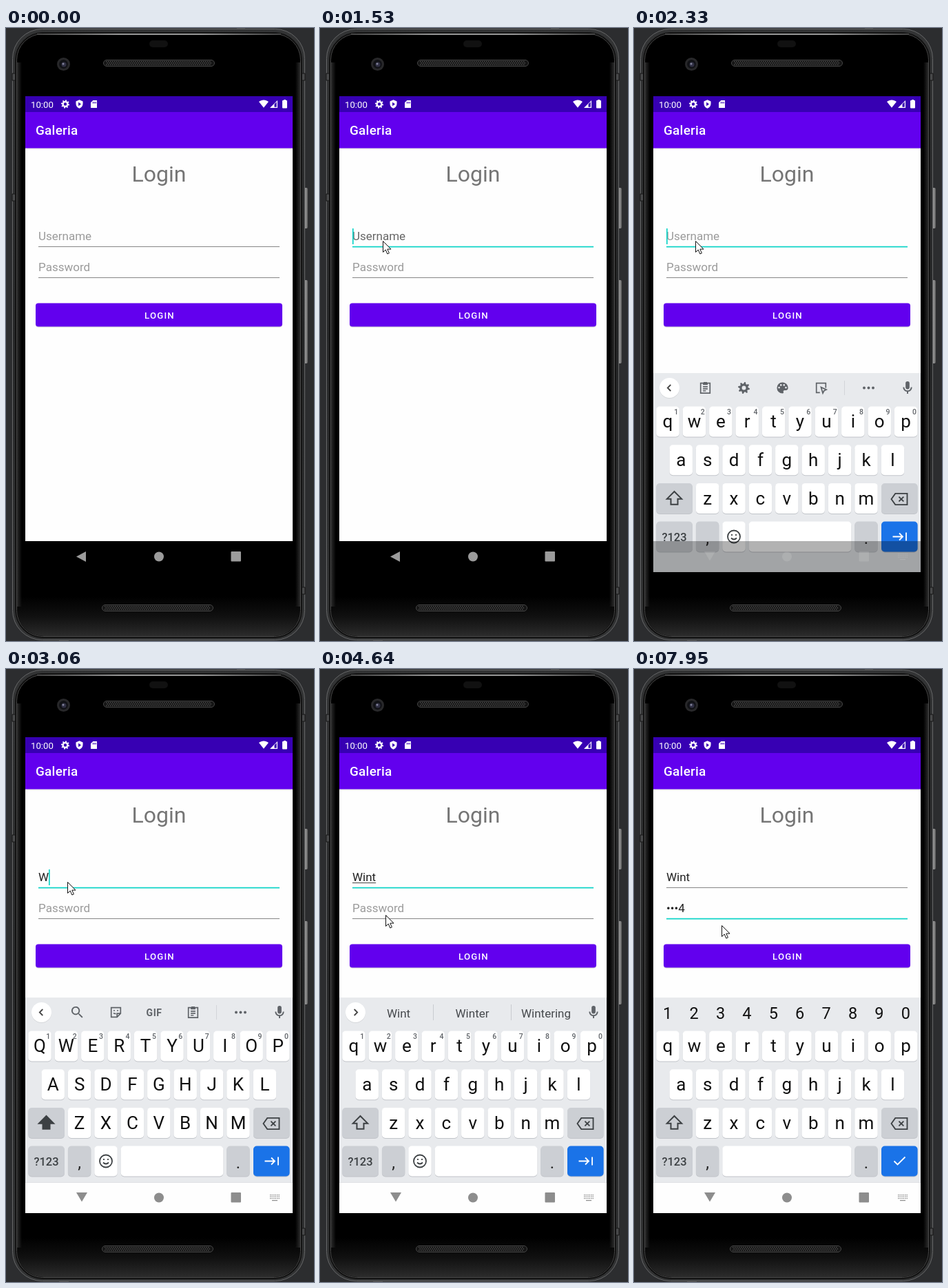
Animation of 447 by 890 pixels, one loop 8000 ms. Source, as an HTML page with a canvas:

```html
<!DOCTYPE html>
<html lang="en">
<head>
<meta charset="utf-8">
<title>Login screen</title>
<style>
  html, body { margin: 0; width: 447px; height: 890px; overflow: hidden; background: #2c2d2f; }
  canvas { display: block; }
</style>
</head>
<body>
<canvas id="stage" width="447" height="890"></canvas>
<script>
const ctx = document.getElementById('stage').getContext('2d');
const LOOP = 8000;
const PURPLE = '#6200ee', TEAL = '#0fd4c8', ICON = '#5f6368', KEY_GREY = '#cccfd4', NAV = '#8d8d8d';

// Icons on a 24-unit grid
const ICONS = {
  search: 'M15.5 14h-.8l-.3-.3A6.5 6.5 0 1 0 13.7 14.4l.3.3v.8l5 5 1.5-1.5zm-6 0a4.5 4.5 0 1 1 0-9 4.5 4.5 0 0 1 0 9z',
  mic: 'M12 14a3 3 0 0 0 3-3V5a3 3 0 0 0-6 0v6a3 3 0 0 0 3 3zm5-3a5 5 0 0 1-10 0H5a7 7 0 0 0 6 6.9V21h2v-3.1a7 7 0 0 0 6-6.9z',
  palette: 'M12 3a9 9 0 0 0 0 18c1.5 0 2-1 1.5-2.2-.6-1.6.3-2.8 2-2.8H18a4 4 0 0 0 3-4c0-5-4-9-9-9z' +
    [[5, 11.5], [8, 7.5], [13, 7.5], [16, 11.5]].map(([x, y]) => `M${x} ${y}a1.5 1.5 0 1 0 3 0a1.5 1.5 0 1 0-3 0z`).join(''),
  clipboard: 'M4 4h16v17H4zM9 3h6M8 6h8M8 10h8M8 13.5h8M8 17h5',
  sticker: 'M14 20H4V4h16v10zM14 20v-6h6M9 8v2M15 8v2M8 13q2 2 4 1',
  touch: 'M10 20H4V4h16v8M12 11l3 10 2-4 4-2z',
  shift: 'M12 4L3.5 12.5H8V19h8v-6.5h4.5z',
  backspace: 'M7 5h15v14H7L2 12zM11.5 9l6 6M17.5 9l-6 6',
  smile: 'M3 12a9 9 0 1 0 18 0a9 9 0 1 0-18 0M9 8.5v2M15 8.5v2M8 14q4 4 8 0',
  next: 'M2 12h14M11.5 7l5 5-5 5M21.5 6v12',
  check: 'M4 12l5 5L20 6',
  left: 'M14 7l-5 5 5 5',
  right: 'M10 7l5 5-5 5',
  shield: 'M12 1l9 4v6c0 6-4 10-9 12-5-2-9-6-9-12V5zM9.5 7v10l7-5z',
  card: 'M20 2H10L4 8v14h16zM9 6h2v4H9zM12.5 6h2v4h-2zM16 6h2v4h-2z',
  wifi: 'M12 22L0 7C7 1 17 1 24 7z',
  signal: 'M1 23h22V1zM14 20.5V12l6.5-6.5v15z',
  gear: gearPath()
};
const POINTER = new Path2D('M.5.5v16l3.7-3.5 2.6 6 2.6-1.1-2.6-5.8h5.2z');

function gearPath() {
  let d = '';
  for (let i = 0; i < 32; i++) {
    const r = i % 4 < 2 ? 10 : 7.2, a = (i + .5) * Math.PI / 16;
    d += `${i ? 'L' : 'M'}${12 + r * Math.cos(a)} ${12 + r * Math.sin(a)}`;
  }
  return d + 'zM8.5 12a3.5 3.5 0 1 0 7 0a3.5 3.5 0 1 0-7 0z';
}

// Drawing helpers
function rect(x, y, w, h, fill, r = 0, stroke) {
  ctx.beginPath();
  ctx.roundRect(x, y, w, h, r);
  ctx.fillStyle = fill;
  ctx.fill();
  if (stroke) { ctx.strokeStyle = stroke; ctx.lineWidth = 1; ctx.stroke(); }
}
function dot(x, y, r, fill) {
  ctx.beginPath();
  ctx.arc(x, y, r, 0, 7);
  ctx.fillStyle = fill;
  ctx.fill();
}
function poly(fill, ...points) {
  ctx.beginPath();
  points.forEach(([x, y]) => ctx.lineTo(x, y));
  ctx.fillStyle = fill;
  ctx.fill();
}
function text(s, x, y, size, color, align = 'left', weight = 400, spacing = 0) {
  ctx.font = `${weight} ${size}px Roboto, sans-serif`;
  ctx.textAlign = align;
  ctx.letterSpacing = spacing + 'px';
  ctx.fillStyle = color;
  ctx.fillText(s, x, y);
}
function inputWidth(s) {
  ctx.font = '400 17px Roboto, sans-serif';
  ctx.letterSpacing = '0px';
  return ctx.measureText(s).width;
}
function icon(name, x, y, scale, color, line = 0) {
  const path = new Path2D(ICONS[name]);
  ctx.save();
  ctx.translate(x, y);
  ctx.scale(scale, scale);
  ctx.translate(-12, -12);
  ctx.fillStyle = ctx.strokeStyle = color;
  ctx.lineWidth = line;
  if (line) ctx.stroke(path); else ctx.fill(path, 'evenodd');
  ctx.restore();
}
function fade(x0, y0, x1, y1, ...colors) {
  const g = ctx.createLinearGradient(x0, y0, x1, y1);
  colors.forEach((c, i) => g.addColorStop(i / (colors.length - 1), c));
  return g;
}

// Timing helpers
const between = (t, a, b) => t >= a && t < b;
function pick(t, value, ...steps) {
  for (let i = 0; i < steps.length && t >= steps[i]; i += 2) value = steps[i + 1];
  return value;
}
function follow(t, points) {
  const i = points.findIndex(p => p[0] > t);
  if (i < 0) return points.at(-1).slice(1);
  const [t0, x0, y0] = points[i - 1], [t1, x1, y1] = points[i], k = (t - t0) / (t1 - t0);
  return [Math.round(x0 + (x1 - x0) * k), Math.round(y0 + (y1 - y0) * k)];
}

function speaker(x, y) {
  rect(x + .5, y + .5, 161, 9, '#151515', 5, '#464646');
  for (let row = 0; row < 3; row++)
    for (let i = 0; i < 51; i++) rect(x + 4 + i * 3 + row % 2 * 1.5, y + 2 + row * 2.2, 1.5, 1.3, '#555');
}

function drawPhone() {
  rect(0, 0, 447, 890, '#2c2d2f');
  [[232, 59], [366, 121]].forEach(([y, h]) => rect(432, y, 6, h, fade(432, 0, 438, 0, '#444', '#999', '#555'), 2));
  rect(335, 0, 12, 4, '#444');
  rect(77, 886, 14, 4, '#444');
  rect(9.5, 1.5, 424, 887, fade(0, 0, 0, 890, '#333435', '#252627', '#333435'), 43, '#666768');
  [[9, 66], [429, 66], [9, 241], [429, 812]].forEach(([x, y]) => rect(x, y, 5, 10, '#48494a', 0, '#161616'));
  rect(13.5, 6.5, 416, 879, '#0a0a0a', 40, '#1b1b1b');
  rect(15.5, 8.5, 412, 875, '#000', 38, '#4a4a4a');
  rect(16, 50, 7, 790, fade(16, 0, 23, 0, '#2b2b2b', '#000'));
  rect(420, 50, 7, 790, fade(420, 0, 427, 0, '#000', '#2b2b2b'));
  rect(45, 8, 354, 2, fade(45, 0, 399, 0, '#444', '#999', '#999', '#444'));
  rect(16, 825, 411, 58, fade(0, 825, 0, 883, 'rgba(40,40,40,0)', 'rgba(40,40,40,.4)', '#2c2c2c'), [0, 0, 38, 38]);
  speaker(141, 46);
  speaker(139, 837);
  rect(208, 18, 27, 10, '#111', 5);
  dot(83.5, 52.5, 9.5, '#28282a');
  dot(83.5, 52.5, 6.5, '#111216');
  dot(84, 53, 3.5, '#303044');
  dot(83, 52, 1.5, '#83849c');
}

function drawStatusBar() {
  rect(28, 99, 388, 23, '#3700b3');
  text('10:00', 36, 115.5, 13.2, '#fff');
  icon('gear', 86, 110.5, .62, '#fff');
  icon('shield', 106.5, 110.5, .56, '#fff');
  icon('card', 127.5, 110.5, .56, '#fff');
  icon('wifi', 374, 110, .58, '#fff');
  icon('signal', 388.5, 110.5, .5, '#fff');
  rect(401, 105, 7, 11.5, '#fff', 1);
  rect(403, 104, 3, 2, '#fff');
}

function drawField(y, hint, value, pressed, focused) {
  if (value) text(value, 47, y + 5, 17, '#212121');
  else text(hint, 47, y + 5, 17, pressed ? '#666' : '#9b9b9b');
  if (focused) rect(47, y + 13.8, 350, 1.8, TEAL);
  else rect(47, y + 14, 350, 1, '#868686');
}

function drawCaret(y, value) {
  rect(Math.round(47 + inputWidth(value)), y - 12, 1.7, 23, TEAL);
}

function drawApp(t) {
  drawStatusBar();
  rect(28, 174, 388, 571, '#fefefe');
  rect(28, 174, 388, 3, fade(0, 174, 0, 177, '#dcdcdc', '#fefefe'));
  rect(28, 122, 388, 52.5, PURPLE);
  text('Galeria', 43, 155, 18.9, '#fff', 'left', 500, .24);
  text('Login', 222, 223.3, 32, '#757575', 'center');

  const user = pick(t, '', 3060, 'W', 3270, 'Wi', 3560, 'Win', 3830, 'Wint');
  const pass = pick(t, '', 6090, '1', 6350, '•2', 6620, '••3', 7280, '•••4');
  const userCaret = pick(t, 0, 1460, 1, 1660, 0, 2330, 1, 2670, 0, 3060, 1, 4370, 0);
  const passCaret = pick(t, 0, 4900, 1, 5430, 0, 5890, 1, 7080, 0, 7280, 1, 7810, 0);
  drawField(303, 'Username', user, between(t, 1390, 1660), between(t, 1390, 4830));
  drawField(348, 'Password', pass, between(t, 4770, 4960), t >= 4830);
  if (between(t, 3130, 4830)) rect(47, 310, inputWidth(user), 1, '#444');
  if (userCaret) drawCaret(303, user);
  if (passCaret) drawCaret(348, pass);

  rect(43, 400, 358, 34.5, '#d4d4d4', 4);
  rect(43, 399.5, 358, 34, PURPLE, 4);
  text('LOGIN', 223, 421.7, 13.2, '#fff', 'center', 500, 1.18);
}

function drawNav(color, keyboard) {
  if (keyboard) {
    poly(color, [102, 760], [118, 760], [110, 773.5]);
    for (let row = 0; row < 3; row++)
      for (let i = 0; i < 6; i++) rect(383 + i * 2.5, 763 + row * 2.5, 1.5, 1.3, color);
    rect(386, 771, 8, 1.2, color);
  } else poly(color, [102, 767.5], [116, 760], [116, 775]);
  dot(222, 767.5, 7, color);
  rect(326.5, 760, 14.5, 14.5, color, 1);
}

function key(x, y, w, fill = '#fff') {
  rect(x, y + 1, w, 44, '#c1c4c9', 5);
  rect(x, y, w, 44, fill, 5);
}

function drawStrip(t) {
  if (t >= 5100) {
    [...'1234567890'].forEach((c, i) => text(c, 48.7 + i * 38.4, 508, 23.5, '#111', 'center'));
    return;
  }
  const words = pick(t, null, 3130, ['W', 'We', 'What'], 3340, ['Wi', 'Will', 'With'],
    3610, ['Win', 'Wine', 'Wind'], 3900, ['Wint', 'Winter', 'Wintering']);
  dot(51.5, 499.5, 14.5, '#d5d7da');
  dot(51.5, 498.5, 14.5, '#fff');
  icon(words ? 'right' : 'left', 51.5, 498.5, .9, '#444', 2);
  icon('mic', 397, 498.5, .95, ICON);
  if (words) {
    words.forEach((w, i) => text(w, [114, 221, 328][i], 505.5, 17, '#46494d', 'center'));
    [164, 277].forEach(x => rect(x, 487, 1, 23, '#c9ccd0'));
    return;
  }
  rect(305, 488, 1, 21, '#d3d5d9');
  [334, 340.5, 347].forEach(x => dot(x, 498.5, 2, ICON));
  if (t < 2470) {
    icon('clipboard', 103.5, 498.5, .85, ICON, 2);
    icon('gear', 159.5, 498.5, .85, ICON);
    icon('palette', 215.5, 498.5, .9, ICON);
    icon('touch', 271.5, 498.5, .85, ICON, 2);
  } else {
    icon('search', 103.5, 498.5, .95, ICON);
    icon('sticker', 159.5, 498.5, .85, ICON, 2);
    text('GIF', 215, 503.5, 14, ICON, 'center', 700, .5);
    icon('clipboard', 271.5, 498.5, .85, ICON, 2);
  }
}

function drawKeyboard(t) {
  const caps = between(t, 2540, 3130), password = t >= 5100;
  rect(28, 477, 388, 313, '#e8eaed');
  drawStrip(t);
  ['qwertyuiop', 'asdfghjkl', 'zxcvbnm'].forEach((letters, row) => {
    const y = 525.5 + row * 55.7, left = 32.3 + [0, .5, 1.5][row] * 38.4;
    [...letters].forEach((c, i) => {
      const x = left + i * 38.4;
      key(x, y, 33.4);
      text(caps ? c.toUpperCase() : c, x + 16.7, y + 30.7, 26, '#111', 'center');
      if (!row && !password) text((i + 1) % 10, x + 29, y + 11.5, 10.5, ICON, 'center', 500);
    });
  });
  key(32.3, 637, 52.6, KEY_GREY);
  icon('shift', 58.5, 659, 1.25, '#3c4043', 1.6);
  if (caps) icon('shift', 58.5, 659, 1.25, '#3c4043');
  key(359, 637, 52.6, KEY_GREY);
  icon('backspace', 385, 660, 1.15, '#3c4043', 1.6);

  key(32.3, 692.5, 52.6, KEY_GREY);
  text('?123', 58.5, 720.5, 16.5, '#3c4043', 'center', 500);
  key(89.9, 692.5, 33.4, KEY_GREY);
  text(',', 106.7, 725, 24, '#222', 'center');
  const spaceX = password ? 128.3 : 166.7;
  key(spaceX, 692.5, 315.3 - spaceX);
  if (!password) {
    key(128.3, 692.5, 33.4);
    icon('smile', 145, 714.5, 1, '#3c4043', 1.8);
  }
  key(320.3, 692.5, 33.4, KEY_GREY);
  text('.', 337, 725, 24, '#222', 'center');
  key(359, 692.5, 52.6, '#1a73e8');
  icon(password ? 'check' : 'next', 385.5, 714.5, 1, '#fff', 1.8);
}

function drawBottom(t) {
  if (t < 2130) return drawNav('#9b9b9b', t >= 1930);
  ctx.save();
  ctx.beginPath();
  ctx.rect(28, 175, 388, 615);
  ctx.clip();
  rect(28, 745, 388, 45, '#fff');
  ctx.globalAlpha = pick(t, .6, 2200, .87, 2330, 1);
  ctx.translate(0, pick(t, 190, 2200, 98, 2330, 24, 2400, 0));
  drawKeyboard(t);
  ctx.restore();
  if (t < 2400) {
    rect(28, 745, 388, 45, 'rgba(0,0,0,.3)');
    drawNav('rgba(255,255,255,.12)', true);
  } else {
    rect(28, 745, 388, 45, '#fefefe');
    rect(28, 745, 388, 1, '#dfe1e4');
    drawNav(NAV, true);
  }
}

function drawPointer(t) {
  if (t < 490) return;
  const snap = (start, step) => start + Math.floor((t - start) / step) * step;
  const time = t < 1200 ? snap(490, 71) : between(t, 4300, 4900) ? snap(4300, 68) : t;
  const [x, y] = follow(time, [
    [490, 286, 729], [700, 215, 560], [845, 138, 388], [987, 80, 272], [1058, 76, 265], [1200, 91, 309],
    [1929, 91, 309], [1930, 89, 309], [4240, 89, 309], [4572, 95, 357], [7949, 95, 357], [7950, 127, 372]
  ]);
  ctx.save();
  ctx.translate(x, y);
  ctx.fillStyle = '#fff';
  ctx.strokeStyle = '#111';
  ctx.lineWidth = 1;
  ctx.fill(POINTER);
  ctx.stroke(POINTER);
  ctx.restore();
}

function frame() {
  const t = performance.now() % LOOP;
  drawPhone();
  drawApp(t);
  drawBottom(t);
  drawPointer(t);
  requestAnimationFrame(frame);
}
frame();
</script>
</body>
</html>
```
